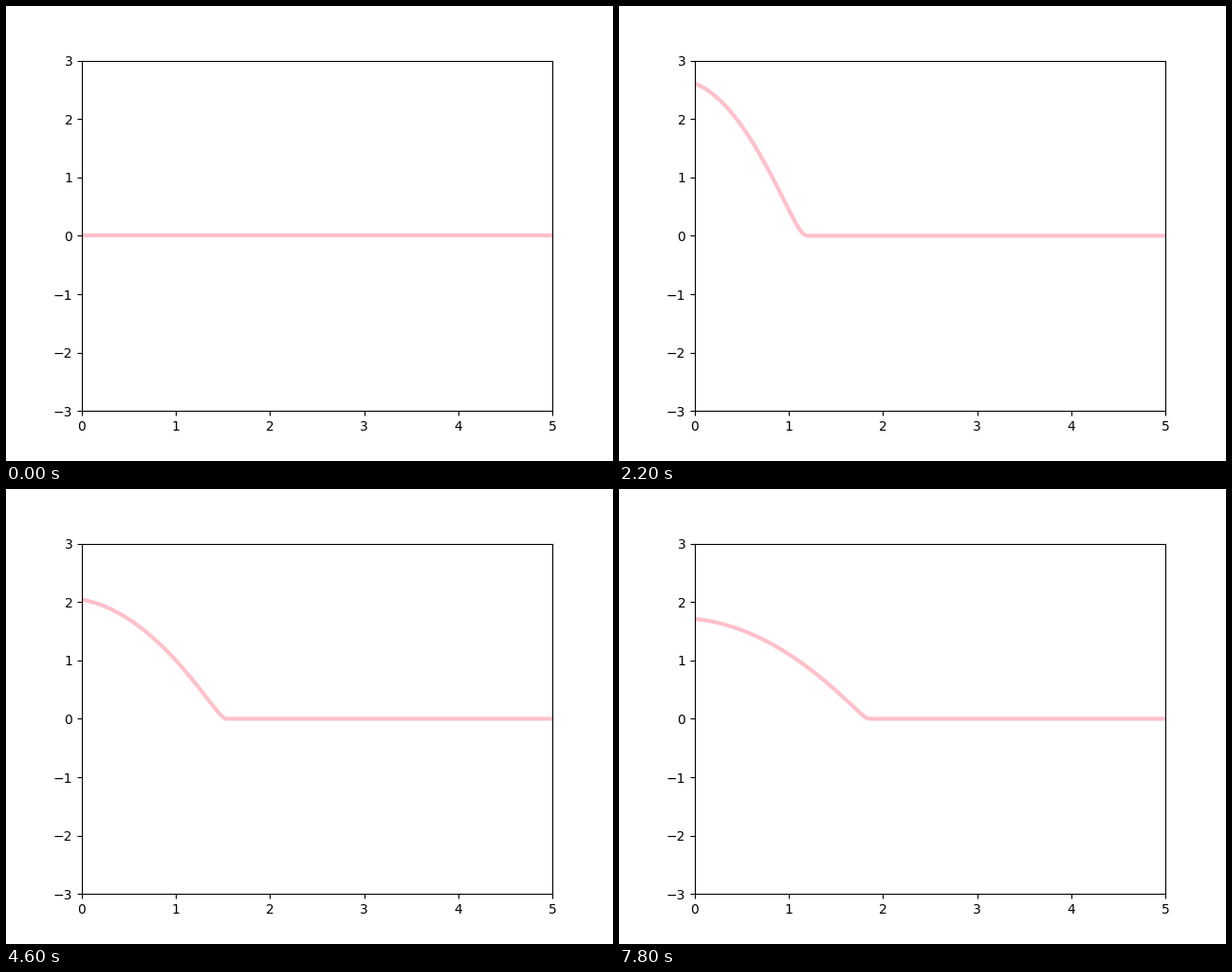
Write a matplotlib script that moves like this. It is 640 by 480 pixels and loops after 8 s.

```python
import numpy as np
import matplotlib.pyplot as plt
from matplotlib.animation import FuncAnimation

# Nonlinear diffusion u_t = (u u_x)_x with a decaying boundary value,
# advanced by one implicit Euler step per frame.
FRAMES = 40
INTERVAL = 200
DT = 0.01
DX = 0.01
REACH = 2.5          # the wave never travels past this point
EPS = 1e-3           # tiny extra diffusivity, keeps Newton regular
RATIO = DT / DX ** 2

x = np.linspace(0, REACH, int(round(REACH / DX)) + 1)
inner = len(x) - 2
stiffness = RATIO * (2 * np.eye(inner) - np.eye(inner, k=1) - np.eye(inner, k=-1))


def edge_value(t):
    return 1.25 * t ** (-1 / 3)


def potential(u):
    return u * (u / 2 + EPS)


def advance(u, t):
    """Solve one implicit step with Newton's method on the potential w."""
    w = potential(u)
    w[0] = potential(edge_value(t))
    for _ in range(60):
        root = np.sqrt(2 * w + EPS ** 2)
        curve = w[2:] - 2 * w[1:-1] + w[:-2]
        residual = (root - EPS - u)[1:-1] - RATIO * curve
        jacobian = stiffness + np.diag(1 / root[1:-1])
        new = np.maximum(w[1:-1] - np.linalg.solve(jacobian, residual), 0)
        change = np.abs(new - w[1:-1]).max()
        w[1:-1] = new
        if change < 1e-8:
            break
    return np.sqrt(2 * w + EPS ** 2) - EPS


profiles = [np.zeros_like(x)]
for n in range(1, FRAMES):
    profiles.append(advance(profiles[-1], n * DT))

fig, ax = plt.subplots(figsize=(6.4, 4.8), dpi=100)
ax.set_xlim(0, 5)
ax.set_ylim(-3, 3)
line, = ax.plot([], [], color="pink", lw=3)
x_full = np.append(x, 5)


def draw(n):
    line.set_data(x_full, np.append(profiles[n], 0))
    return line,


anim = FuncAnimation(fig, draw, frames=FRAMES, interval=INTERVAL,
                     init_func=lambda: draw(0), repeat=True, repeat_delay=0)
plt.show()
```
